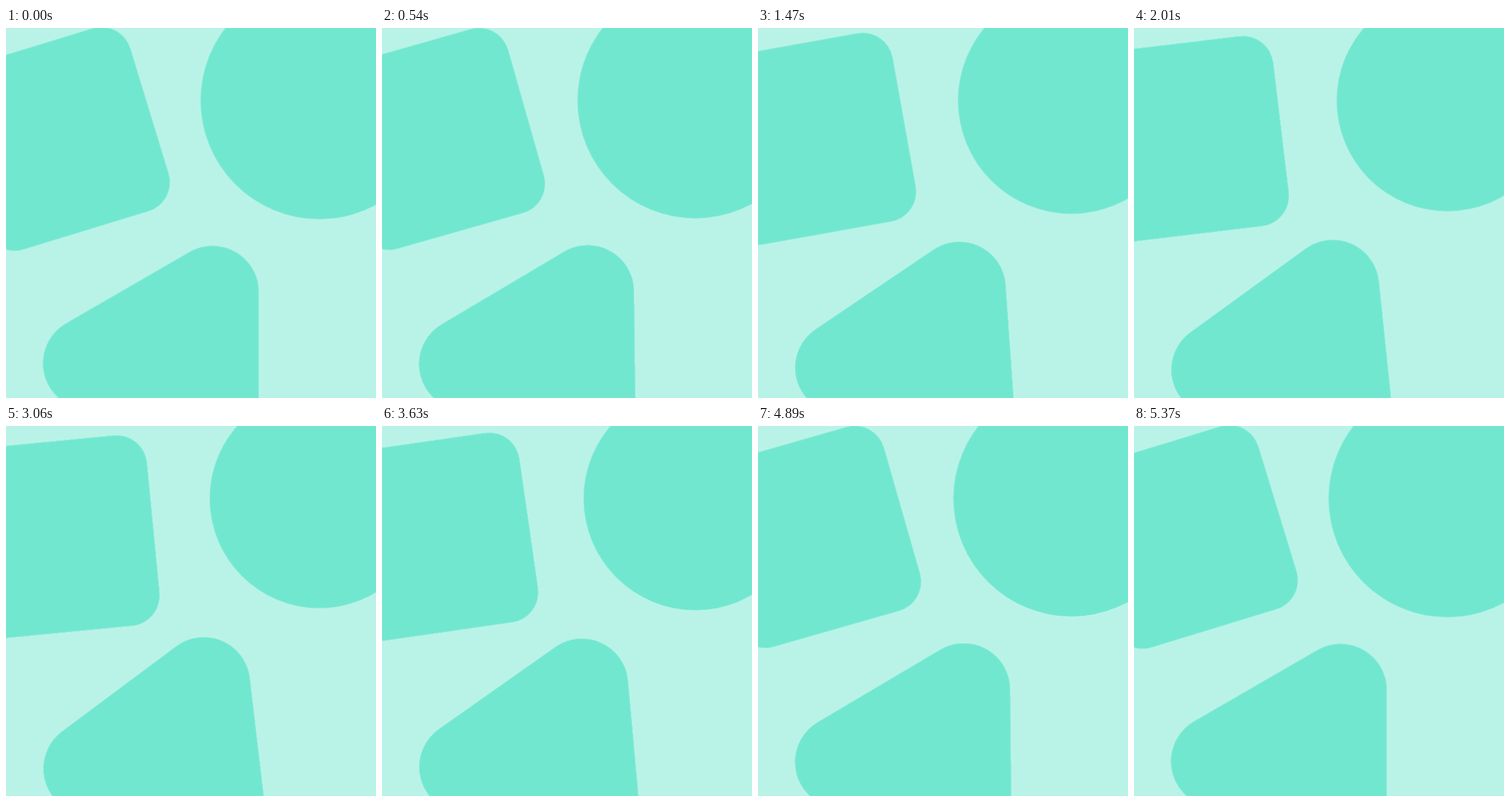
These frames come from a looping animation (540x540 px, 5.4 s). An HTML page without scripts:

```html
<!DOCTYPE html>
<html lang="en">
<head>
<meta charset="utf-8">
<title>Swaying shapes</title>
<style>
  :root {
    --back: #b9f3e8;
    --shape: #72e7d0;
  }
  html, body {
    margin: 0;
    width: 100%;
    height: 100%;
    overflow: hidden;
    background: var(--back);
  }
  svg {
    display: block;
    width: 100%;
    height: 100%;
  }
  .shape {
    fill: var(--shape);
    animation: 2.7s cubic-bezier(.37, 0, .63, 1) infinite alternate;
  }
  .square { animation-name: tilt; }
  .circle { animation-name: shrink; }
  .triangle {
    stroke: var(--shape);
    stroke-width: 135px;
    stroke-linejoin: round;
    animation-name: lean;
  }
  @keyframes tilt {
    from { transform: rotate(-17deg); }
    to { transform: rotate(-5deg); }
  }
  @keyframes shrink {
    from { transform: scale(1); }
    to { transform: scale(.92); }
  }
  @keyframes lean {
    from { transform: rotate(0deg); }
    to { transform: rotate(-7deg); }
  }
</style>
</head>
<body>
<!-- Each group sets the pivot; its shape is drawn around 0,0. -->
<svg viewBox="0 0 540 540">
  <g transform="translate(75.9 161.9)">
    <rect class="shape square" x="-139.6" y="-139.6" width="279.2" height="279.2" rx="44.6"/>
  </g>
  <g transform="translate(457.3 105.8)">
    <circle class="shape circle" r="173.3"/>
  </g>
  <g transform="translate(211.5 489.5)">
    <path class="shape triangle" d="M-90 0L90-104V104Z"/>
  </g>
</svg>
</body>
</html>
```
